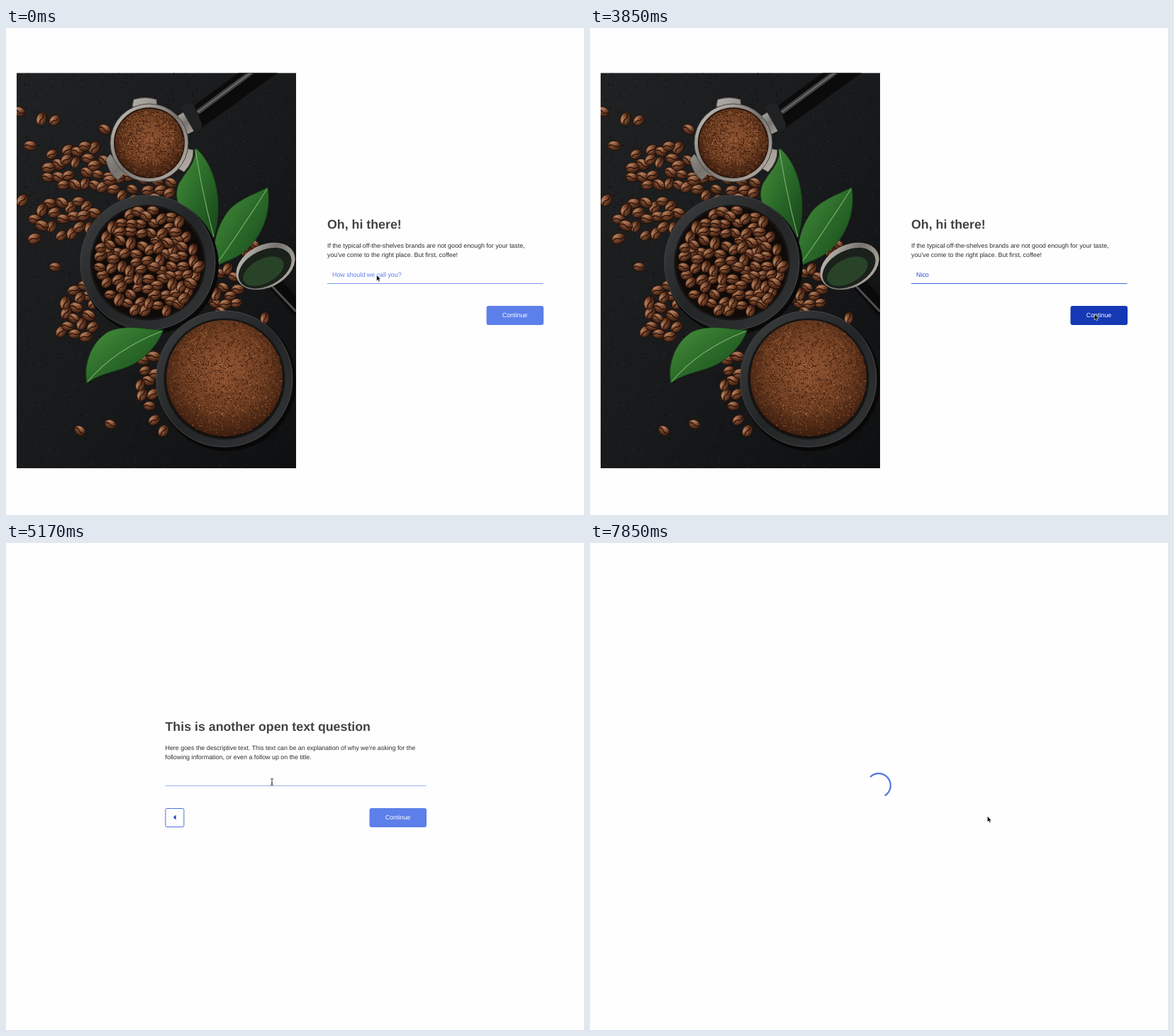
Animation, 815 px wide and 687 px high, one loop 7.99 s. Source, as an HTML page:

```html
<!DOCTYPE html>
<html lang="en">
<head>
<meta charset="utf-8">
<title>Coffee form</title>
<style>
  html, body { margin: 0; width: 100%; height: 100%; overflow: hidden; background: #fefefe; }
  svg { display: block; width: 815px; height: 687px; }
  text { font: 8.9px "Liberation Sans", Arial, sans-serif; fill: #2d2d2f; text-rendering: geometricPrecision; }
  .title { font-size: 17.8px; font-weight: bold; fill: #424343; }
  .label { fill: #fff; text-anchor: middle; }
</style>
</head>
<body>
<svg id="stage" viewBox="0 0 815 687" xmlns="http://www.w3.org/2000/svg">
  <defs>
    <clipPath id="frame"><rect x="15" y="63.5" width="394" height="557.5"/></clipPath>
    <linearGradient id="slate" x2="1" y2="1">
      <stop stop-color="#202122"/><stop offset=".5" stop-color="#191a1b"/><stop offset="1" stop-color="#0e0f10"/>
    </linearGradient>
    <radialGradient id="roast" cx=".38" cy=".3" r=".75">
      <stop stop-color="#b17b59"/><stop offset=".45" stop-color="#744329"/><stop offset="1" stop-color="#33190e"/>
    </radialGradient>
    <radialGradient id="powder" cx=".5" cy=".42" r=".6">
      <stop stop-color="#8f5331"/><stop offset=".6" stop-color="#6c3c20"/><stop offset="1" stop-color="#381b0e"/>
    </radialGradient>
    <linearGradient id="rim" x2="1" y2="1">
      <stop stop-color="#3e3f40"/><stop offset=".5" stop-color="#232425"/><stop offset="1" stop-color="#343536"/>
    </linearGradient>
    <linearGradient id="steel" x2="1" y2="1">
      <stop stop-color="#d0ccc6"/><stop offset=".5" stop-color="#75716d"/><stop offset="1" stop-color="#c2bbb2"/>
    </linearGradient>
    <linearGradient id="green" x2="1" y2="1">
      <stop stop-color="#4b8f3c"/><stop offset=".5" stop-color="#2a6a29"/><stop offset="1" stop-color="#174419"/>
    </linearGradient>
    <g id="bean">
      <ellipse rx="8.6" ry="6.6" fill="url(#roast)" stroke="#1d0e08" stroke-width=".8"/>
      <path d="M-7.8 .8Q-3-2 0 .3T7.8-.6" fill="none" stroke="#2a130b" stroke-width="1.4"/>
      <path d="M-5-3.4Q-1-5.2 3.5-4" fill="none" stroke="#d0a585" stroke-width=".9" opacity=".55"/>
    </g>
  </defs>
  <g id="photo" clip-path="url(#frame)"></g>
  <g id="forms"></g>
  <circle id="spinner" r="16.8" fill="none" stroke="#5277e3" stroke-width="2.2" pathLength="360" stroke-dasharray="194 166"/>
  <g id="cursor">
    <path id="arrow" d="M0 0V8.3L1.9 6.7 3.2 9.4 4.6 8.7 3.4 6.1H5.9Z" fill="#000" stroke="#fff" stroke-width=".6"/>
    <path id="beam" d="M-2-4.5Q0-4.5 0-3.5Q0-4.5 2-4.5M0-3.5V3.5M-2 4.5Q0 4.5 0 3.5Q0 4.5 2 4.5M-1 1.3H1" fill="none" stroke="#222" stroke-width=".9"/>
  </g>
</svg>
<script>
const LOOP = 7990;
const $ = id => document.getElementById(id);
const show = (el, on) => el.setAttribute("display", on ? "inline" : "none");

let seed = 11;
const random = () => (seed = (seed * 16807) % 2147483647) / 2147483647;

// ---- Still life -------------------------------------------------------
const bean = (x, y) =>
  `<use href="#bean" transform="translate(${x.toFixed(1)} ${y.toFixed(1)}) rotate(${(random() * 120 - 80) | 0}) scale(${(.95 + random() * .2).toFixed(2)})"/>`;

function inEllipse(cx, cy, rx, ry) {
  const a = random() * Math.PI * 2, r = Math.sqrt(random());
  return [cx + rx * r * Math.cos(a), cy + ry * r * Math.sin(a)];
}

function scatter(area, gap) {
  const placed = [];
  for (let i = 0; i < 1500; i++) {
    const p = inEllipse(...area);
    if (placed.every(q => Math.hypot(p[0] - q[0], p[1] - q[1]) > gap)) placed.push(p);
  }
  return placed.map(p => bean(...p)).join("");
}

function specks(area, color, count, size) {
  let d = "";
  for (let i = 0; i < count; i++) {
    const [x, y] = inEllipse(...area);
    d += `M${x.toFixed(1)} ${y.toFixed(1)}h${size}v${size}h-${size}z`;
  }
  return `<path d="${d}" fill="${color}"/>`;
}

const disc = (x, y, r, fill, extra = "") => `<circle cx="${x}" cy="${y}" r="${r}" fill="${fill}" ${extra}/>`;
const shape = (d, fill, extra = "") => `<path d="${d}" fill="${fill}" ${extra}/>`;
const stroke = (d, color, width) => shape(d, "none", `stroke="${color}" stroke-width="${width}"`);

const grounds = (x, y, r) => disc(x, y, r, "url(#powder)") +
  specks([x, y, r, r], "#42200f", r * 16, 1.5) +
  specks([x, y, r, r], "#a0633c", r * 8, 1.1) +
  specks([x - 4, y - 8, r * .8, r * .75], "#bd8257", r * 3, 1);

const leaf = (outline, vein) =>
  shape(outline, "url(#green)", 'stroke="#153a17" stroke-width=".8"') + stroke(vein, "#83b26d", 1.1);

const bowl = (x, y, r, inner) => disc(x + 3, y + 4, r + 2, "#080808") +
  disc(x, y, r, "url(#rim)", 'stroke="#454647" stroke-width="1"') +
  disc(x, y, inner, "#100b09", 'stroke="#151515" stroke-width="3"');

const loose = [[18, 118], [50, 128], [69, 130], [34, 166], [139, 143], [23, 243], [40, 297],
  [69, 337], [78, 428], [104, 568], [147, 559], [209, 553], [222, 568], [365, 409]];
const piles = [[103, 196, 52, 30], [82, 268, 46, 26], [185, 226, 54, 18], [103, 403, 22, 42],
  [200, 487, 13, 48], [305, 370, 24, 32], [352, 311, 15, 7]];

$("photo").innerHTML =
  `<rect x="15" y="63" width="394" height="559" fill="url(#slate)"/>` +
  specks([212, 342, 280, 390], "#2b2c2d", 1500, 1.2) +
  specks([212, 342, 280, 390], "#0c0c0d", 1500, 1.5) +
  loose.map(p => bean(...p)).join("") +
  piles.map(p => scatter(p, 13)).join("") +
  // portafilter
  shape("M262 112L335 58H390L276 141Z", "#0b0b0c") +
  stroke("M270 119L352 58", "#3f4042", 7) + stroke("M270 119L352 58", "#77787a", 1.5) +
  shape("M236 128L261 112L274 141L251 152Z", "url(#steel)") +
  shape("M246 112Q256 103 265 109L277 137Q274 146 265 146Z", "#202122") +
  shape("M178 111L180 101Q196 96 212 101L213 113ZM141 185L147 178 168 204 158 214Q146 208 141 185ZM248 169L264 172Q265 188 251 203L239 196Z",
    "url(#steel)", 'stroke="#5d5955" stroke-width="1"') +
  disc(202, 162, 55, "url(#steel)", 'stroke="#48443f" stroke-width="1"') +
  disc(202, 162, 50, "#2b1710") + grounds(202, 162, 48) +
  // leaves
  leaf("M267 169C293 190 309 244 293 296C261 280 230 250 244 219C256 199 268 190 267 169Z", "M267 172Q277 235 293 294") +
  leaf("M369 225C374 255 365 288 341 311C322 329 308 327 295 338C290 311 295 280 316 255C332 240 351 234 369 225Z", "M368 227Q334 281 295 336") +
  // tamper
  stroke("M377 357L414 400", "#0a0a0b", 20) + stroke("M373 362L409 400", "#4d4e50", 3) +
  `<g transform="rotate(-27 366 336)"><ellipse cx="366" cy="336" rx="44" ry="30" fill="url(#steel)"/>` +
  `<ellipse cx="364" cy="338" rx="40" ry="25" fill="#1a211a"/><ellipse cx="360" cy="341" rx="31" ry="17" fill="#294329"/></g>` +
  // bowls
  bowl(200, 331, 95, 80) + scatter([200, 331, 73, 74], 11) +
  leaf("M114 501C109 476 119 443 145 428C172 417 198 426 222 426C213 449 192 472 166 480C145 487 128 490 114 501Z", "M115 499Q154 453 219 428") +
  bowl(308, 495, 96, 84) + grounds(308, 494, 82);

// ---- Forms ------------------------------------------------------------
const BLUE = "#2048cb";

const pages = [
  { x: 453, y: 0, right: 757.5, from: 0, to: 4000, focus: 1190,
    title: "Oh, hi there!",
    lines: ["If the typical off-the-shelves brands are not good enough for your taste,",
      "you've come to the right place. But first, coffee!"],
    hint: "How should we call you?", word: "Nico", keys: [1930, 2080, 2220, 2370], restRule: "#7d9bed" },
  { x: 224.5, y: -18, right: 592.5, from: 4880, to: 7850, focus: 5310,
    title: "This is another open text question",
    lines: ["Here goes the descriptive text. This text can be an explanation of why we’re asking for the",
      "following information, or even a follow up on the title."],
    hint: "", word: "Test", keys: [5760, 6060, 6510, 6660], restRule: "#9db1f1", back: true }
];

const backButton = `<rect x="224.9" y="392.5" width="26" height="26" rx="2" fill="#fff" stroke="#4c70dd"/>` +
  `<path d="M235.8 405L239.7 401.4V408.6Z" fill="${BLUE}"/>`;

$("forms").innerHTML = pages.map(p => `<g transform="translate(0 ${p.y})">
  <text class="title" x="${p.x}" y="282.7">${p.title}</text>
  <text x="${p.x}" y="309.6">${p.lines[0]}</text>
  <text x="${p.x}" y="323">${p.lines[1]}</text>
  <text class="value" x="${p.x + 7}" y="350.9"></text>
  <rect class="caret" y="343" width=".9" height="10" fill="${BLUE}"/>
  <rect class="rule" x="${p.x}" y="360" width="${p.right - p.x}" height="1"/>
  <rect class="button" x="${p.right - 79.5}" y="392.5" width="79.5" height="26" rx="2"/>
  <text class="label" x="${p.right - 40}" y="408.2">Continue</text>
  ${p.back ? backButton : ""}</g>`).join("");

pages.forEach((p, i) => {
  p.el = $("forms").children[i];
  for (const part of ["value", "caret", "rule", "button"]) p[part] = p.el.querySelector("." + part);
});

// ---- Pointer: time, x, y, text beam -----------------------------------
const pointer = [
  [0, 522.5, 348.5], [440, 522, 350], [590, 522, 348, 1],
  [3120, 640, 358], [3270, 797, 382], [3410, 738, 400], [3560, 711.3, 403.5],
  [4580, 640, 384], [4730, 490, 355], [4880, 400, 345], [5020, 380, 339, 1], [5170, 375, 337, 1],
  [6660, 470, 365], [6810, 577.3, 397.3], [6960, 570, 392], [7100, 564, 387], [7250, 560.3, 385.3]
];

function caretOn(p, t, typed) {
  if (t < p.focus) return false;
  const idle = typed ? t - p.keys[typed - 1] - 590 : t - p.focus - 450;
  return idle < 0 || Math.floor(idle / 440) % 2 === 1;
}

function buttonFill(p, t, x, y) {
  if (t < p.keys[0]) return "#5d7fea";
  if (t < p.keys[0] + 140) return "#3f64db";
  const top = 392 + p.y;
  const hover = x > p.right - 80 && x < p.right && y > top && y < top + 27;
  return hover ? "#1538b4" : BLUE;
}

function drawPage(p, t, x, y) {
  const visible = t >= p.from && t < p.to;
  show(p.el, visible);
  if (!visible) return;
  const typed = p.keys.filter(k => t >= k).length;
  const fill = buttonFill(p, t, x, y);
  p.value.textContent = typed ? p.word.slice(0, typed) : p.hint;
  p.value.style.fill = typed ? BLUE : "#5d7de9";
  p.caret.setAttribute("x", p.x + 7 + (typed ? p.value.getComputedTextLength() : 0));
  show(p.caret, caretOn(p, t, typed));
  p.rule.setAttribute("fill", t >= p.focus ? "#3f66d8" : p.restRule);
  p.button.setAttribute("fill", fill);
  p.button.setAttribute("stroke", fill);
}

function drawSpinner(t) {
  const [first, second] = pages;
  const start = t >= second.to ? second.to : first.to;
  show($("spinner"), t >= start && !(t >= second.from && t < second.to));
  const turn = Math.floor((t - start) / 146) * 146 * .36;
  $("spinner").setAttribute("transform", `translate(407 342) rotate(${225 + turn})`);
}

function draw(t) {
  const [, x, y, beam] = pointer.filter(k => t >= k[0]).pop();
  show($("photo"), t < pages[0].to);
  pages.forEach(p => drawPage(p, t, x, y));
  drawSpinner(t);
  $("cursor").setAttribute("transform", `translate(${x} ${y})`);
  show($("arrow"), !beam);
  show($("beam"), beam);
}

const begin = performance.now();
function tick() {
  draw((performance.now() - begin) % LOOP);
  requestAnimationFrame(tick);
}
tick();
</script>
</body>
</html>
```
